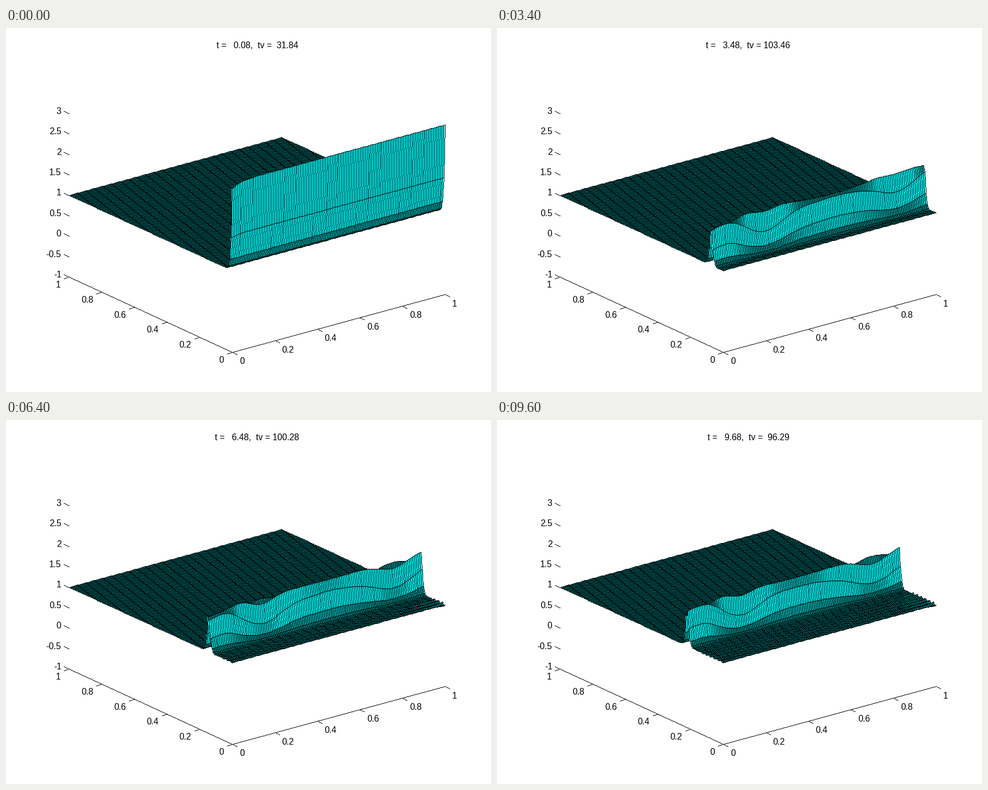
Recreate the animation shown at these times as a matplotlib script. Size 864 by 648 pixels, loop 9.8 s.

```python
import numpy as np
import matplotlib.pyplot as plt
from matplotlib.animation import FuncAnimation

W, H, DPI = 864, 648, 100
FRAMES, INTERVAL = 49, 200
N = 128            # cells per side
ROWS = 42          # rows near the front edge that the wave can reach
FLAT = 0.45        # brightness of level faces

plt.rcParams["font.family"] = "Liberation Sans"
plt.rcParams["font.size"] = 15.5 * 72 / DPI

fig = plt.figure(figsize=(W / DPI, H / DPI), dpi=DPI, facecolor="white")
ax = fig.add_axes([0, 0, 1, 1])


def project(x, y, z):
    """Orthographic view of the unit square, z from -1 to 3."""
    u = 403 + 379 * x - 291 * y
    v = 577 - 103 * x - 134 * y - 72.75 * (z + 1)
    return np.stack(np.broadcast_arrays(u, v), axis=-1)


def stroke(img, start, end):
    """Hard black lines, one pixel wide, between pairs of points."""
    p = np.rint(np.reshape(start, (-1, 2)))
    d = np.rint(np.reshape(end, (-1, 2))) - p
    steps = np.maximum(np.abs(d).max(axis=1), 1)
    k = np.arange(steps.max() + 1)[:, None]
    s = np.minimum(k / steps, 1)[..., None]
    u, v = np.rint(p + s * d).astype(int).reshape(-1, 2).T
    img[v, u] = 0


def draw_strip(img, far, near, light):
    """One row of cells: shaded faces, then their outlines."""
    mid = (far + near) / 2
    left, right = int(np.ceil(mid[0, 0])), int(mid[-1, 0])
    u = np.arange(left, right + 1)
    a, b = np.interp(u, *far.T), np.interp(u, *near.T)
    top, bottom = np.minimum(a, b), np.maximum(a, b)
    v = np.arange(int(top.min()), int(bottom.max()) + 2)
    inside = (v[:, None] >= top) & (v[:, None] <= bottom)

    rgb = np.zeros((len(u), 3), np.uint8)
    rgb[:, 1:] = 255 * np.interp(u, (mid[1:, 0] + mid[:-1, 0]) / 2, light)[:, None]
    part = img[v[0]:v[-1] + 1, left:right + 1]
    part[inside] = np.broadcast_to(rgb, part.shape)[inside]

    stroke(img, far[:-1], far[1:])
    stroke(img, far, near)
    stroke(img, near[:-1], near[1:])


def draw_sheet(img, z, first):
    """Paint the rows of z, which start at row `first`, from far to near."""
    rows = first + np.arange(len(z))[:, None]
    p = project(X, rows / N, z)
    drop = np.abs(np.diff(z, axis=0))
    drop = (drop[:, 1:] + drop[:, :-1]) / 2
    light = FLAT + (1 - FLAT) * np.clip(drop / 0.3, 0, 1) ** 2
    for j in range(len(z) - 2, -1, -1):
        draw_strip(img, p[j + 1], p[j], light[j])


def draw_axes(img):
    def tick(p, step, label, shift, ha):
        stroke(img, p, p + step)
        ax.text(p[0] + shift[0], p[1] + shift[1], label, ha=ha, va="baseline")

    origin = project(0, 0, -1)
    stroke(img, origin, project(0, 1, -1))
    stroke(img, origin, project(1, 0, -1))
    for k in range(6):
        s = k / 5
        tick(project(s, 0, -1), (8, 4), f"{s:g}", (13, 21.5), "left")
        tick(project(0, s, -1), (-9, 3), f"{s:g}", (-14.5, 19), "right")
    for k in range(9):
        z = -1 + k / 2
        tick(project(0, 1, z), (-9, -4), f"{z:g}", (-13.5, 1), "right")


def bump(x, mid, width):
    return np.exp(-((x - mid) / width) ** 2)


X = np.arange(N + 1)[None, :] / N
J = np.arange(ROWS + 1)[:, None]
BEND = (0.85 * bump(X, 0.25, 0.11) - 0.15 * bump(X, 0.08, 0.06)
        - 0.18 * bump(X, 0.6, 0.14) + 0.4 * bump(X, 0.86, 0.09)
        - 0.3 * bump(X, 1.02, 0.07))
LEFT, RIGHT = np.exp(-X / 0.03), np.exp((X - 1) / 0.06)


def surface(t):
    """Height over the front rows: one travelling crest and its wake."""
    grow = np.clip((t - 0.3) / 3.5, 0, 1)
    crest = -0.85 + (3.04 + 0.12 * X) * (t - 0.08) + grow * BEND

    amp = 0.95 + 0.12 * np.exp(-max(t - 1.68, 0) / 2.5)
    amp = amp + 1.85 * np.exp(-(t - 0.08) / 0.3)
    amp = amp * (1 - 0.07 * LEFT + 0.06 * grow * RIGHT)
    z = 1 + amp / np.cosh((J - crest) / 1.5) ** 2

    behind = np.clip((crest - 8 - J) / 4, 0, 1)
    ripple = np.cos(2 * np.pi * (J - 2.3) / 3.1)
    z = z + behind * ripple * (0.004 + 0.045 * RIGHT + 0.012 * LEFT)
    return z - 0.045 * np.exp(-t / 4) * bump(J, crest - 4.5, 1.6)


def total_variation(t):
    times = [0.08, 0.48, 0.88, 1.68, 3.48, 5.48, 6.48, 7.68, 9.68]
    values = [31.84, 80.2, 103.6, 105.47, 103.46, 101.37, 100.28, 98.90, 96.29]
    return np.interp(t, times, values)


# Everything that stands still: axes and the level part of the sheet.
base = np.full((H, W, 3), 255, np.uint8)
draw_axes(base)
draw_sheet(base, np.ones((N + 1 - ROWS, N + 1)), ROWS)

picture = ax.imshow(base, extent=(0, W, H, 0), aspect="auto",
                    interpolation="nearest")
ax.axis("off")
title = ax.text(447.5, 36, "", ha="center", va="baseline")


def update(k):
    t = 0.08 + 0.2 * k
    img = base.copy()
    draw_sheet(img, surface(t), 0)
    picture.set_data(img)
    title.set_text(f"t = {t:6.2f},  tv = {total_variation(t):6.2f}")
    return picture, title


anim = FuncAnimation(fig, update, frames=FRAMES, init_func=lambda: update(0),
                     interval=INTERVAL, repeat=True, repeat_delay=0)
plt.show()
```
